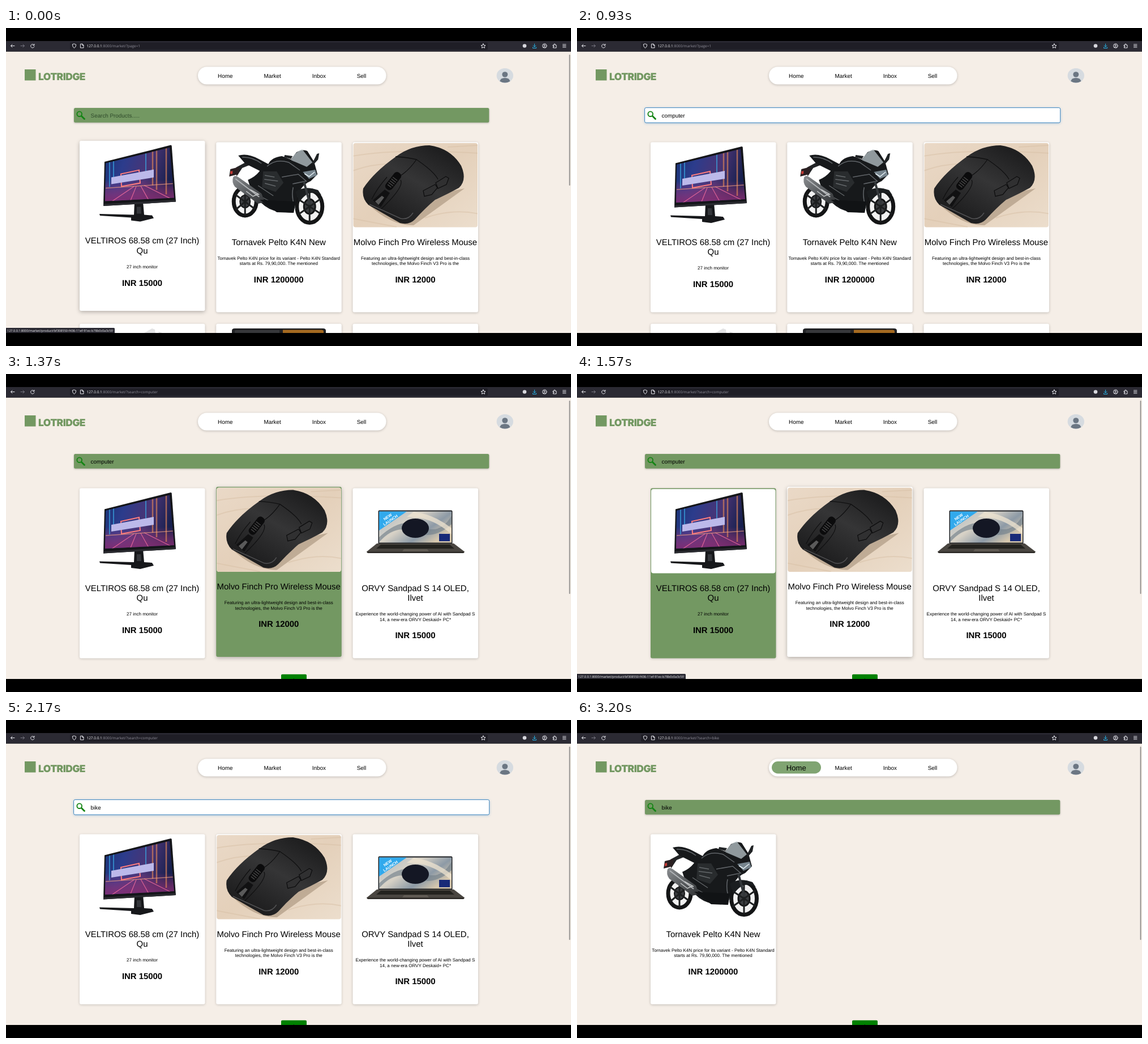
Animation, 998 px wide and 561 px high, one loop 3270 ms. Source, as an HTML page:

```html
<!DOCTYPE html>
<html lang="en">
<head>
<meta charset="utf-8">
<title>Market search</title>
<style>
html, body { margin: 0; width: 100%; height: 100%; overflow: hidden; background: #000; }
svg { display: block; width: 998px; height: 561px; font-family: "Liberation Sans", Arial, sans-serif; text-rendering: geometricPrecision; }
.ui { font-family: "Open Sans", "Noto Sans", sans-serif; }
.icon { fill: none; stroke: #e8e8ee; stroke-width: 1; stroke-linecap: round; stroke-linejoin: round; }
.mid { text-anchor: middle; }
.title { font-size: 14.95px; }
.note { font-size: 8.03px; }
.price { font-size: 14.9px; font-weight: bold; }
.nav { font-size: 9.95px; }
.soft { filter: drop-shadow(0 1px 2px rgba(0, 0, 0, .22)); }
</style>
</head>
<body>
<svg id="stage" viewBox="0 0 998 561">
<defs>
  <clipPath id="view"><rect y="41.5" width="998" height="496.5"/></clipPath>
  <clipPath id="photo"><rect x="131" y="203" width="219.5" height="148.5" rx="4"/></clipPath>
  <clipPath id="panel"><path d="M176 241L289 213.500 297 302 175 308z"/></clipPath>
  <linearGradient id="glow" x2="1" y2=".25">
    <stop stop-color="#14306f"/><stop offset=".35" stop-color="#2c3c8c"/>
    <stop offset=".68" stop-color="#4a3474"/><stop offset="1" stop-color="#17204f"/>
  </linearGradient>
  <linearGradient id="floor" x2="0" y2="1">
    <stop stop-color="#c23a78" stop-opacity="0"/><stop offset="1" stop-color="#7b2a72"/>
  </linearGradient>
  <linearGradient id="wood" x2="1" y2="1">
    <stop stop-color="#ead9c7"/><stop offset=".5" stop-color="#e4d0ba"/><stop offset="1" stop-color="#ecdecd"/>
  </linearGradient>
  <linearGradient id="shell" x1=".2" y1=".9" x2=".8" y2=".1">
    <stop stop-color="#1c1c1d"/><stop offset=".55" stop-color="#353536"/><stop offset="1" stop-color="#1f1f20"/>
  </linearGradient>
  <linearGradient id="lcd" x2="1" y2=".6">
    <stop stop-color="#a9b8c6"/><stop offset=".45" stop-color="#d8d2c6"/>
    <stop offset=".75" stop-color="#8d9aa6"/><stop offset="1" stop-color="#d7c8ae"/>
  </linearGradient>
  <linearGradient id="pipe" x2="1" y2="1">
    <stop stop-color="#8a8d90"/><stop offset=".5" stop-color="#5a5d60"/><stop offset="1" stop-color="#303234"/>
  </linearGradient>

  <g id="monitor">
    <path d="M165 330.500L226 332 227 310 242 309 244 332 258 333 261 338 237 344 221 342 221 337 166 333.500z" fill="#17181b"/>
    <path d="M231 318h7l1 12h-8z" fill="#34363b"/>
    <path d="M174 238.500L291 209q1.500 0 1.700 1.500L300 309 172 316.500z" fill="#141519"/>
    <path d="M172 313L300 305.500V309L172 316.500z" fill="#2a2b30"/>
    <g clip-path="url(#panel)">
      <path d="M170 205H300V312H170z" fill="url(#glow)"/>
      <path d="M170 270H300V312H170z" fill="url(#floor)"/>
      <path d="M259 215v65M266 213v75M283 212v84" stroke="#e2865a" stroke-width="2.500" opacity=".65"/>
      <path d="M183 238v45M190 235v42M247 222v36" stroke="#39a5e0" stroke-width="2" opacity=".7"/>
      <path d="M226 282L186 309M230 282L219 309M238 281L252 306M244 280L290 303" stroke="#ef6b9c" stroke-width="1.300" opacity=".8"/>
      <path d="M176 285L295 277" stroke="#ffab83" stroke-width="1.500" opacity=".6"/>
      <path d="M203 260L235 253 237 276 204 282z" fill="none" stroke="#ff7d7d" stroke-width="2"/>
      <path d="M186 266L261 252V266L186 278z" fill="#bcb9ea"/>
    </g>
  </g>

  <g id="bike">
    <g fill="#3b3d40" stroke="#141516">
      <ellipse cx="181" cy="306" rx="20" ry="25" stroke-width="7" fill="#f1f1f1"/>
      <ellipse cx="295" cy="315" rx="22.500" ry="28.500" stroke-width="7" fill="#f1f1f1"/>
      <ellipse cx="181" cy="306" rx="9" ry="11" stroke-width="2"/>
      <ellipse cx="295" cy="315" rx="10" ry="13" stroke-width="3"/>
    </g>
    <path d="M181 282v48M164 294L198 319M165 320L197 293M295 288v54M275 302L315 328M275 329L315 301" stroke="#1d1f20" stroke-width="3"/>
    <path d="M165 246L180 238 191 241 176 247 166 262z" fill="#222426"/>
    <path d="M155 249L171 245 169 258 153 262z" fill="#2b2022"/>
    <path d="M155 253l4-1v5l-4 1z" fill="#c53a35"/>
    <path d="M169 225Q185 220 205 231L222 240Q228 228 246 226L262 232 272 219Q284 213 291 217L303 236 309 258 297 270Q283 275 275 292 270 311 266 326L240 324Q222 321 209 308L194 292 186 268Q200 262 207 252L181 239z" fill="#17191b"/>
    <path d="M262 233Q270 218 282 214L300 237 290 245z" fill="#b9c4c8" opacity=".75"/>
    <path d="M300 238L308 222 312 221 310 232 302 241M262 231L250 228 251 224 265 226" fill="#202325"/>
    <path d="M283 254L305 250 308 260 294 266z" fill="#76848d"/>
    <path d="M286 257l8 5 10-8" fill="none" stroke="#e3edf2" stroke-width="1.500"/>
    <path d="M220 244Q235 230 258 237L278 251M176 228Q194 227 210 239M246 263L275 258 289 270 265 275M266 281Q262 299 270 319" fill="none" stroke="#616569" stroke-width="1.500"/>
    <path d="M213 253h24l12 20-14 16-24-8z" fill="#292c2e"/>
    <path d="M216 260l17 3M215 267l24 3M216 274l19 5M204 278l27 18M212 299l25 13" stroke="#64686b" stroke-width="1.300"/>
    <path d="M160 263Q163 259 169 263L210 292 216 307 204 310 163 280Q157 272 160 263z" fill="url(#pipe)"/>
    <path d="M164 266L206 298" stroke="#b1b4b7" stroke-width="2"/>
    <path d="M183 288l12 9 9-4M190 285l16 9" stroke="#c7c9ca" stroke-width="1.500" fill="none"/>
    <path d="M207 303L270 306 267 326 237 325z" fill="#111315"/>
    <path d="M270 289Q286 277 310 286L316 295Q294 282 277 307z" fill="#1b1e20"/>
    <path d="M285 271L296 312" stroke="#34383b" stroke-width="4"/>
  </g>

  <g id="mouse" transform="translate(-482.500)">
    <path d="M612 202H835V353H612z" fill="url(#wood)"/>
    <path d="M612 226Q690 212 835 221M612 252Q650 238 690 240M740 335Q790 318 835 328M612 336L690 351M780 210L835 207" fill="none" stroke="#d7bfa5" stroke-width="2" opacity=".5"/>
    <path d="M640 311Q680 349 720 348L810 283 770 291z" fill="#8e7861" opacity=".45"/>
    <path d="M631 283Q650 254 690 226 716 207 748 207 785 212 804 243 815 268 800 282 780 293 758 303 740 318 722 338 712 348 696 344L640 312Q628 300 631 283z" fill="url(#shell)"/>
    <path d="M688 227Q709 228 725 232 712 251 696 261M725 232Q756 253 763 267M697 268Q704 280 663 319M673 263Q656 282 646 302" fill="none" stroke="#101011" stroke-width="1.300"/>
    <path d="M648 304L669 285 678 291 662 316z" fill="#111112"/>
    <path d="M652 306l12-10 4 3-10 13z" fill="#5a5a5a"/>
    <g transform="rotate(-52 684 270)"><rect x="666" y="263" width="36" height="14" rx="6" fill="#0b0b0c"/><path d="M673 266v8m4-9v10m4-10v10m4-10v10m4-10v10" stroke="#444" stroke-width="1.500"/></g>
    <path d="M737 287L758 276 762 282 752 294 739 297zM759 273L777 262 782 265 778 276 763 283z" fill="#303031" stroke="#0e0e0f" stroke-width="1.300"/>
    <path d="M642 311L697 336Q711 339 719 326" fill="none" stroke="#515153" stroke-width="1.500"/>
  </g>

  <g id="laptop" transform="translate(-482.500)">
    <rect x="657.500" y="240.500" width="131" height="60" rx="2" fill="#202225"/>
    <path d="M659 242.500H787V297.500H659z" fill="url(#lcd)"/>
    <path d="M659 288Q700 250 733 268T787 250V265Q755 294 721 279T659 297z" fill="#73818d" opacity=".65"/>
    <path d="M720 243Q757 248 787 272V283Q752 251 708 252z" fill="#efe4d0" opacity=".75"/>
    <path d="M659 242.500H708L659 276z" fill="#31a9ec"/>
    <g fill="#fff" font-weight="bold" font-size="7" class="mid" transform="translate(676 255) rotate(-34)"><text y="-1">NEW</text><text x="1" y="6.500">LAUNCH</text></g>
    <ellipse cx="723" cy="272" rx="24" ry="17" fill="#141724"/>
    <path d="M765 282H784V295H765z" fill="#182a78"/>
    <path d="M655 299H791L810 313.500 808 316H639L637 313.500z" fill="#4a4641"/>
    <path d="M662 301H784L792 308H654z" fill="#24231f"/>
    <path d="M703 309H744L747 313H700z" fill="#605b54"/>
    <path d="M637 313.500H810L808 316H639z" fill="#2d2a27"/>
  </g>
</defs>

<rect width="998" height="561"/>
<g id="page" clip-path="url(#view)">
  <rect y="41" width="998" height="498" fill="#f5eee7"/>
  <rect x="33" y="73" width="19.500" height="19.500" fill="#739862"/>
  <text x="57" y="92" font-family="Inter, Roboto, sans-serif" font-weight="900" font-size="17.500" letter-spacing="-.6" fill="#739862">LOTRIDGE</text>
  <rect class="soft" x="339" y="68.500" width="332.500" height="31" rx="15.500" fill="#fff"/>
  <rect id="pill" x="344" y="73" width="87" height="21.500" rx="10.700" fill="#80a472"/>
  <g class="nav mid">
    <text id="home" x="387.300">Home</text><text x="470.700" y="87.500">Market</text>
    <text x="552.800" y="87.500">Inbox</text><text x="628" y="87.500">Sell</text>
  </g>
  <ellipse cx="881.300" cy="84" rx="14.700" ry="13" fill="#d6dbe0"/>
  <ellipse cx="881.300" cy="82" rx="5" ry="4.800" fill="#6b7683"/>
  <path d="M872.300 94q1-6 9-6t9 6q-9 5-18 0z" fill="#6b7683"/>
  <rect id="field" rx="2.500"/>
  <g stroke="#148414" fill="none"><circle cx="129.700" cy="151.700" r="4.300" stroke-width="1.900"/><path d="M133.500 155.500L138.500 160.500" stroke-width="2.800" stroke-linecap="round"/></g>
  <text id="query" x="149.600" y="157.800" font-size="9.850"></text>
  <g id="all"></g><g id="computer"></g><g id="bikes"></g>
  <g id="more">
    <rect x="486" y="529.700" width="45" height="20" rx="2" fill="#008000"/>
    <text x="508.500" y="543.500" class="mid" font-size="9.500">1</text>
  </g>
  <rect id="thumb" x="994.700" y="47" width="1.700" rx=".8" fill="#8b8987"/>
</g>
<g id="status" class="ui">
  <path d="M0 529H190.500q1.500 0 1.500 1.500V538H0z" fill="#2b2a33"/>
  <text x="2" y="535.700" font-size="5.570" fill="#f4f4f6">127.0.0.1:8000/market/product/bf308550-f436-11ef-91ec-b78b0c0a3c5f/</text>
</g>
<g id="bar">
  <rect y="23" width="998" height="18.500" fill="#2b2a33"/>
  <rect x="113" y="25.500" width="738" height="13" rx="2" fill="#1f1e26"/>
  <g class="icon">
    <path d="M15 31.500H8.500M11 29L8.500 31.500 11 34"/>
    <path d="M26 31.500H32.500M30 29L32.500 31.500 30 34" stroke="#777681"/>
    <path d="M49.500 30A3.200 3.200 0 1 0 50 32.500M50 28.300V30.500H47.800"/>
    <path d="M120.500 28L123.700 29.200Q123.700 33.500 120.500 35.500 117.300 33.500 117.300 29.200z"/>
    <path d="M131.800 28.200H135L137 30.200V35H131.800zM134.800 28.200V30.500H137"/>
    <path d="M843 27.800L844.200 30.300 847 30.600 844.900 32.500 845.500 35.300 843 33.900 840.500 35.300 841.100 32.500 839 30.600 841.800 30.300z"/>
    <path d="M933.600 28V33M931.300 31L933.600 33.300 935.900 31M930.500 34V35.500H936.700V34" stroke="#25b5ea"/>
    <circle cx="951.300" cy="31.500" r="3.700"/><circle cx="951.300" cy="30.500" r="1.200"/><path d="M949 34Q951.300 32 953.600 34"/>
    <path d="M966.500 30H968V28.300H970V30H972V35H966.500V33H968V31.700H966.500z"/>
    <path d="M983.500 29H989M983.500 31.500H989M983.500 34H989"/>
  </g>
  <circle cx="916" cy="31.500" r="3.300" fill="#d8d8de"/>
  <text class="ui" x="142.500" y="34.200" font-size="6.450" fill="#f4f4f6">127.0.0.1<tspan id="path" fill="#8f8e99"></tspan></text>
</g>
</svg>
<script>
const $ = id => document.getElementById(id);
const LOOP = 3270, GREEN = '#739862', STEP = 241.25;

const goods = {
  monitor: { title: ['VELTIROS 68.58 cm (27 Inch)', 'Qu'], note: ['27 inch monitor'], price: 15000 },
  bike: {
    title: ['Tornavek Pelto K4N New'],
    note: ['Tornavek Pelto K4N price for its variant - Pelto K4N Standard', 'starts at Rs. 79,90,000. The mentioned'],
    price: 1200000
  },
  mouse: {
    title: ['Molvo Finch Pro Wireless Mouse'],
    note: ['Featuring an ultra-lightweight design and best-in-class', 'technologies, the Molvo Finch V3 Pro is the'],
    price: 12000
  },
  laptop: {
    title: ['ORVY Sandpad S 14 OLED,', 'Ilvet'],
    note: ['Experience the world-changing power of AI with Sandpad S', '14, a new-era ORVY Deskaid+ PC*'],
    price: 15000
  }
};

const box = (y = 201.5) => `<rect class="soft" x="130" y="${y}" width="221.500" height="300" rx="3" fill="#fff"/>`;
const label = (cls, y, s) => `<text class="mid ${cls}" x="240.500" y="${y}">${s}</text>`;

function card(name, col) {
  const { title, note, price } = goods[name];
  const top = 382.8 + (title.length - 1) * 17.4 + 26;
  return `<g data-x="${col * STEP}" transform="translate(${col * STEP})">${box()}
    <g clip-path="url(#photo)"><rect x="130" y="202" width="222" height="150" fill="#fff"/><use href="#${name}"/></g>
    ${title.map((s, i) => label('title', 382.8 + i * 17.4, s)).join('')}
    ${note.map((s, i) => label('note', top + i * 9.3, s)).join('')}
    ${label('price', top + (note.length - 1) * 9.3 + 30.8, 'INR ' + price)}</g>`;
}
const row = names => names.map(card).join('');

$('all').innerHTML = row(['monitor', 'bike', 'mouse']) +
  [0, 1, 2].map(i => `<g transform="translate(${i * STEP})">${box(521.7)}</g>`).join('') +
  `<path d="M244 538L258 530 263 532 264 538zM269 535L276 538H270z" fill="#e3e3e4"/>
   <path d="M399 540V534q0-4 5-4H560q5 0 5 4v6z" fill="#202124"/>
   <path d="M489 540V532.500H557q4 0 4 3V540z" fill="#a4691f"/>
   <path d="M404 540V535q0-2 3-2H483V540z" fill="#36373a"/>`;
$('computer').innerHTML = row(['monitor', 'mouse', 'laptop']);
$('bikes').innerHTML = row(['bike']);

const cards = {
  first: $('all').children[0],
  screen: $('computer').children[0],
  mouse: $('computer').children[1]
};

// eased value along [time, value] keys
function along(t, keys) {
  if (t <= keys[0][0]) return keys[0][1];
  for (let i = 1; i < keys.length; i++) {
    const [a, from] = keys[i - 1], [b, to] = keys[i];
    if (t < b) {
      const k = (t - a) / (b - a);
      return from + (to - from) * k * k * (3 - 2 * k);
    }
  }
  return keys[keys.length - 1][1];
}
const within = (t, a, b) => t >= a && t < b;
const show = (id, on) => { $(id).style.display = on ? '' : 'none'; };
const set = (el, attrs) => { for (const k in attrs) el.setAttribute(k, attrs[k]); };

function pose(el, lift, hover) {
  set(el, { transform: `translate(${el.dataset.x} ${-2.4 * lift})` });
  const back = el.firstElementChild;
  set(back, { fill: hover ? GREEN : '#fff' });
  back.style.filter = `drop-shadow(0 ${1 + 1.5 * lift}px ${2 + 1.5 * lift}px rgba(0,0,0,${.18 + .1 * lift}))`;
}

function typed(t) {
  if (t < 370) return '';
  if (t < 1880) return 'computer'.slice(0, 1 + Math.floor((t - 370) / 71.4));
  return 'bike'.slice(0, 1 + Math.floor((t - 1880) / 96.6));
}

function draw(t) {
  const stage = t < 970 ? 0 : t < 2230 ? 1 : 2;
  ['all', 'computer', 'bikes'].forEach((id, i) => show(id, i === stage));
  show('more', stage > 0);
  $('path').textContent = ':8000/market/?' + ['page=1', 'search=computer', 'search=bike'][stage];

  pose(cards.first, along(t, [[20, 1], [150, 0]]), false);
  pose(cards.mouse, along(t, [[1160, 0], [1310, 1], [1570, 1], [1670, 0]]), within(t, 1170, 1560));
  pose(cards.screen, along(t, [[1570, 0], [1625, .5], [1680, 0]]), within(t, 1560, 1630));
  show('status', t < 30 || within(t, 1560, 1700));

  const focus = within(t, 110, 970) || within(t, 1640, 2230);
  const pad = focus ? .4 : 0;
  set($('field'), {
    x: 120 - pad, y: 141 - pad, width: 733.3 + 2 * pad, height: 25.7 + 2 * pad,
    fill: focus ? '#fff' : GREEN, stroke: focus ? '#3c84bd' : 'none'
  });
  $('field').style.filter = focus
    ? 'drop-shadow(0 1px 2px rgba(50,130,200,.35))'
    : 'drop-shadow(0 1px 1.5px rgba(0,0,0,.25))';
  const word = typed(t);
  $('query').textContent = word || 'Search Products.....';
  set($('query'), { fill: word ? '#000' : '#2f4a2b' });

  show('thumb', !within(t, 450, 970));
  set($('thumb'), { height: stage ? 341 : 231 });

  const big = t >= 2530;
  set($('home'), { y: big ? 88.6 : 87.5, 'font-size': big ? 13.1 : 9.95 });
  set($('pill'), { opacity: Math.max(0, Math.min(1, (t - 3040) / 160)) });
}

const start = performance.now();
function tick() {
  draw((performance.now() - start) % LOOP);
  requestAnimationFrame(tick);
}
tick();
</script>
</body>
</html>
```
